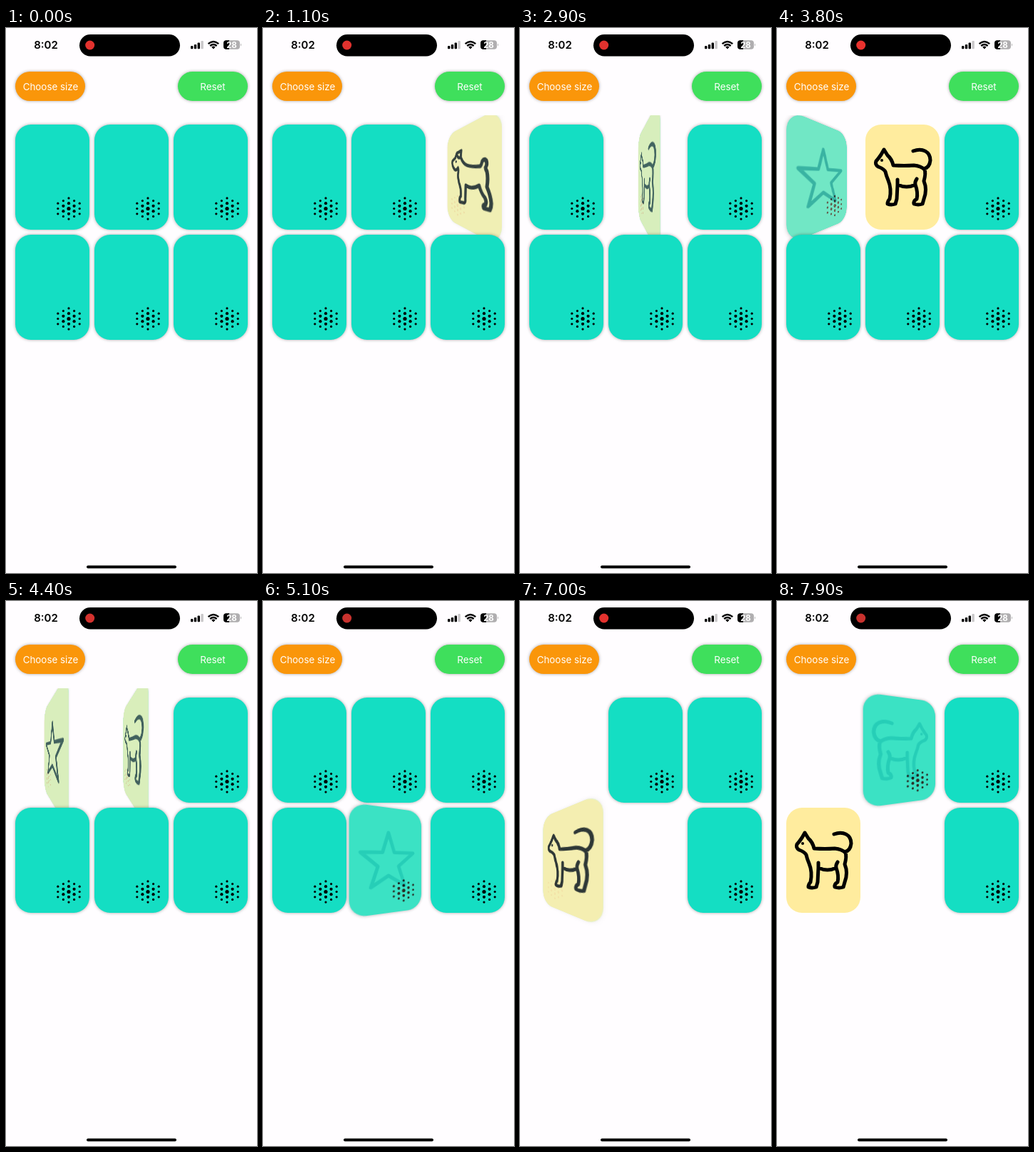
These frames come from a looping animation (352 by 762 pixels, 8000 ms). An HTML page:

```html
<!DOCTYPE html>
<html lang="en">
<head>
<meta charset="utf-8">
<title>Memory game</title>
<style>
  html, body { margin: 0; width: 100%; height: 100%; overflow: hidden; background: #fffdff; }
  #ui { position: absolute; left: 0; top: 0; }
  #ui text { font-family: Inter, Roboto, sans-serif; text-anchor: middle; }
  .button { position: absolute; top: 61px; width: 98px; height: 41px; border-radius: 21px;
    box-shadow: 0 0 4px rgba(0, 0, 0, .35); }
  #board { position: absolute; left: 0; top: 122px; width: 352px; height: 640px; overflow: hidden; }
  .card { position: absolute; width: 104px; height: 147px; }
  .face { position: absolute; inset: 0; border-radius: 22px; }
  .back { background: #14dec3; box-shadow: 0 0 4px rgba(0, 0, 0, .35); }
  .front { background: #ffec9e; }
  .face svg { display: block; }
  .front path { fill: none; stroke: #000; stroke-width: 5; stroke-linecap: round; stroke-linejoin: round; }
</style>
</head>
<body>
<div class="button" style="left:13px;background:#fa960a"></div>
<div class="button" style="left:241px;background:#3fdf5c"></div>
<div id="board"></div>
<svg id="ui" width="352" height="762">
  <text x="56" y="29.3" font-size="15" font-weight="600">8:02</text>
  <rect x="103" y="9" width="141" height="30.5" rx="15.2"/>
  <circle id="rec" cx="117.7" cy="24" r="6.5"/>
  <rect x="259" y="25" width="3.4" height="4.2" rx="1"/>
  <rect x="263.8" y="23" width="3.4" height="6.2" rx="1"/>
  <rect x="268.6" y="20.5" width="3.4" height="8.7" rx="1"/>
  <rect x="273.4" y="18" width="3.4" height="11.2" rx="1" fill="#c8c6c8"/>
  <g fill="none" stroke="#000" stroke-width="2.4">
    <path d="M283.6 22.2Q290.9 15.6 298.2 22.2M286.2 25Q290.9 20.8 295.6 25"/>
    <path d="M288.2 26.6Q290.9 24.6 293.6 26.6L290.9 29.5Z" fill="#000" stroke="none"/>
  </g>
  <clipPath id="cell"><rect x="305" y="17.3" width="23" height="12.5" rx="4"/></clipPath>
  <g clip-path="url(#cell)">
    <rect x="305" y="17" width="23" height="13" fill="#b0aeb0"/>
    <rect x="305" y="17" width="8" height="13"/>
  </g>
  <path d="M329 21.5Q331 23.5 329 25.5Z" fill="#b0aeb0"/>
  <text x="316.5" y="27.8" font-size="11.5" font-weight="700" fill="#fff">28</text>
  <g font-size="13.4" fill="#fff">
    <text x="62.5" y="87">Choose size</text>
    <text x="290" y="87">Reset</text>
  </g>
  <rect x="113" y="751.5" width="126" height="4" rx="2"/>
</svg>
<script>
const LOOP = 8, NEVER = 99;

const art = {
  star: `<path d="M52 35L60.5 62.5L90 63L67 82L76.5 110L52 95L27.5 110L37 82L14 63L43.5 62.5Z"/>`,
  cat: `<path d="M22 42L26 35L31 43Q37 48 39 57Q55 58 68 57Q78 58 83 63Q85 68 82 79Q87 91 82 104L80 111
    Q74 113 68 111Q67 107 72 104Q74 95 70 84Q58 90 45 84L44 104L42 111Q36 113 31 111Q31 107 34 104
    Q37 90 32 78Q29 71 28 66Q26 62 18 59Q13 56 15 51Q18 48 22 42Z
    M45 77V86M72 76Q69 80 70 85M67 37C80 32 91 38 91 50Q90 60 82 62"/><circle cx="23" cy="50" r="2"/>`,
  dog: `<path d="M27 36L23 43L15 47Q13 54 21 61Q25 64 30 59Q32 62 30 71Q31 80 35 87Q38 95 37 102
    Q33 105 34 111L44 111Q48 110 47 104L48 85Q60 91 73 84Q76 93 82 98Q85 102 83 106Q78 107 80 111
    L89 111Q91 108 91 103Q90 94 85 85Q87 75 85 67Q83 64 83 62Q86 59 84 54Q81 51 78 54Q77 58 75 60
    Q60 60 51 57Q42 54 37 44L38 34ZQ28 43 33 44L37 44"/><circle cx="25" cy="49" r="2"/>`
};

// Each card: picture, [turn up, turn down] times in seconds, removal time
const cards = [
  { pic: 'star', turns: [[3.724, 4.28], [5.728, NEVER]], gone: 6.25 },
  { pic: 'cat', turns: [[2.729, 4.28], [7.859, NEVER]] },
  { pic: 'dog', turns: [[0.87, 2.1]] },
  { pic: 'cat', turns: [[6.75, NEVER]] },
  { pic: 'star', turns: [[1.53, 2.1], [5.059, NEVER]], gone: 6.25 },
  { pic: 'dog', turns: [] }
];

// Hexagonal dot grid: columns of 3, 4, 5, 4, 3
function dotGrid() {
  let dots = '';
  for (let col = -2; col <= 2; col++) {
    const n = 5 - Math.abs(col);
    for (let i = 0; i < n; i++) {
      const row = i - (n - 1) / 2;
      const ring = Math.max(Math.abs(col), Math.abs(row) + Math.abs(col) / 2);
      dots += `<circle cx="${75 + col * 7.6}" cy="${117.5 + row * 7.3}" r="${2.6 - ring * 0.5}"/>`;
    }
  }
  return dots;
}

const svg = inner => `<svg width="104" height="147">${inner}</svg>`;
const dots = dotGrid();
const board = document.getElementById('board');
const rec = document.getElementById('rec');

cards.forEach((card, i) => {
  const el = card.el = document.createElement('div');
  el.className = 'card';
  el.style.left = 13 + (i % 3) * 111 + 'px';
  el.style.top = 13 + Math.floor(i / 3) * 154 + 'px';
  el.innerHTML = `<div class="face back">${svg(dots)}</div><div class="face front">${svg(art[card.pic])}</div>`;
  board.append(el);
});

// Critically damped spring from 0 to 1
function spring(t) {
  if (t <= 0) return 0;
  const x = t * 2 * Math.PI / 0.55;
  return 1 - (1 + x) * Math.exp(-x);
}

function pose(face, angle, opacity) {
  face.style.transform = `perspective(147px) rotateY(${angle}deg)`;
  face.style.opacity = opacity;
}

function draw() {
  const t = performance.now() / 1000 % LOOP;
  for (const { el, turns, gone = NEVER } of cards) {
    let p = turns.reduce((sum, [up, down]) => sum + spring(t - up) - spring(t - down), 0);
    if (p < 0.002) p = 0;
    if (p > 0.998) p = 1;
    const [back, front] = el.children;
    pose(back, 180 * p, 1 - p);
    pose(front, 180 * p - 180, p);
    el.style.visibility = t < gone ? 'visible' : 'hidden';
  }
  const glow = 0.5 - 0.5 * Math.cos((t - 2) / 3 * 2 * Math.PI);
  rec.setAttribute('fill', `rgb(${200 + 36 * glow}, 50, 46)`);
  requestAnimationFrame(draw);
}
draw();
</script>
</body>
</html>
```
